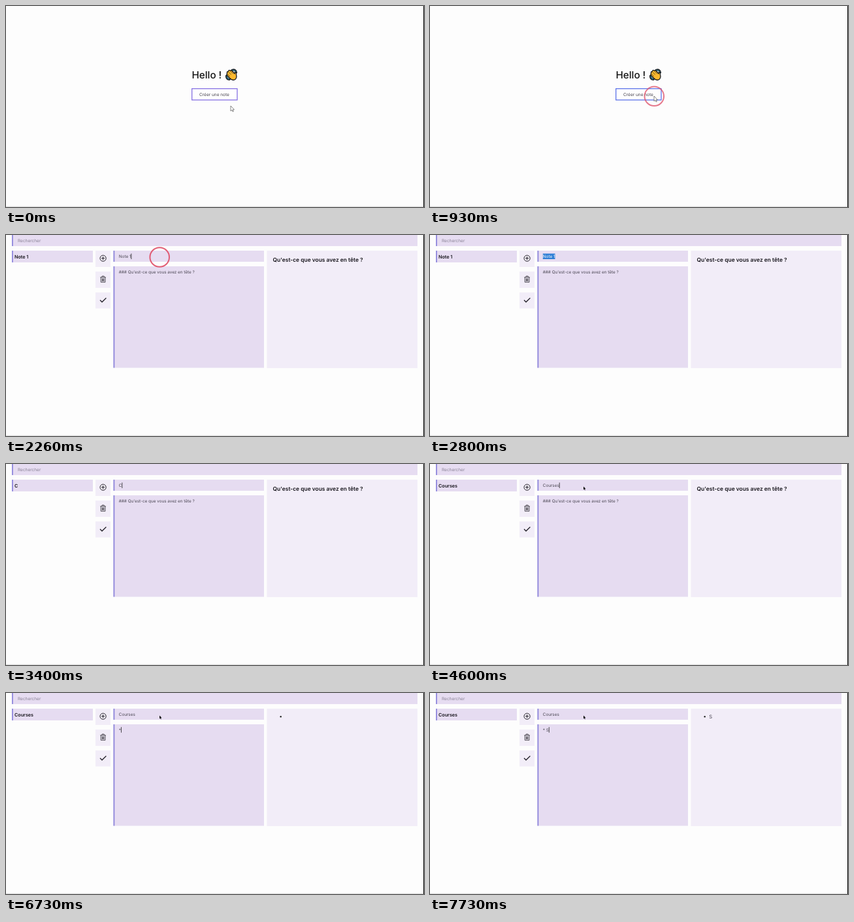
An HTML page for the animation above (8000 ms loop, 640x308 px).

```html
<!DOCTYPE html>
<html lang="fr">
<head>
<meta charset="utf-8">
<title>Notes</title>
<style>
  html, body { margin: 0; height: 100%; overflow: hidden; background: #fdfdfd; }
  svg { display: block; width: 100vw; height: 100vh; }
  text { font: 6.35px Inter, "Open Sans", sans-serif; fill: #4a4653; white-space: pre; text-rendering: geometricPrecision; }
  .field { fill: #e6dcf1; }
  .pale { fill: #f2edf8; }
  .edge { fill: #8f87dc; }
  .icon { fill: none; stroke: #25222b; stroke-width: 1; }
  .strong { font-weight: 600; fill: #17151c; }
  .selection { fill: #2f7fd6; }
  .caret { fill: #222; }
</style>
</head>
<body>
<svg viewBox="0 0 640 308" preserveAspectRatio="none">
  <rect width="640" height="308" fill="#fdfdfd"/>

  <g id="welcome">
    <text x="284.5" y="111" style="font-size:15.2px;font-weight:500;fill:#111">Hello !</text>
    <g stroke="#17191c" stroke-linejoin="round" stroke-linecap="round">
      <path d="M346 98.5Q351.500 96.500 352.500 102M337.500 107Q337.500 112 342 112.500" fill="none" stroke-width="3.200"/>
      <path d="M346.500 98.700Q351 97.500 352 101.500M338 107.500Q338.300 111.300 341.500 112" fill="none" stroke="#2c7f96" stroke-width="1.300"/>
      <path d="M338.500 102.500Q338 100.500 340 100.500L340.500 99.500Q341.500 97.700 343.200 99L344 98.800Q345.500 98.300 346.500 99.800L350 103.800L350 102Q351.600 100.800 352.200 103L353 108Q352.800 113 348 113.500Q345 113.600 342.500 110.500L338.700 106.500Q337.300 104.800 338.500 102.500Z" fill="#fbb92e" stroke-width="1.300"/>
      <path d="M340.500 101L344.500 105M343.500 99.500L347 103.300M339 104L342.500 107.500" fill="none" stroke-width=".6"/>
    </g>
    <rect id="create" x="284.700" y="126.700" width="69.300" height="17.300" fill="#fefefe" stroke-width="1.200"/>
    <text x="296" y="138" style="font-size:6.5px">Créer une note</text>
  </g>

  <g id="app">
    <rect class="field" x="9" y="0" width="621" height="17"/>
    <rect class="edge" x="9" y="0" width="1.800" height="17"/>
    <text x="18" y="11" style="font-size:6.5px;fill:#8b8497">Rechercher</text>

    <rect class="field" x="9" y="24" width="124" height="18"/>
    <rect class="edge" x="9" y="24" width="1.800" height="18"/>
    <text id="item" class="strong" x="13" y="35.700" style="font-size:7.2px"></text>

    <rect class="pale" x="137" y="24" width="23" height="25"/>
    <rect class="pale" x="137" y="56" width="23" height="25"/>
    <rect class="pale" x="137" y="88" width="23" height="24.500"/>
    <g class="icon">
      <circle cx="148.600" cy="35.700" r="4.600"/>
      <path d="M146 35.700h5.200M148.600 33.100v5.200"/>
      <path d="M144.300 64.800h8.600M147 64.500v-1.500h3.200v1.500M145.300 65v7.300h6.600V65M147.300 66.500v4.500M148.600 66.500v4.500M149.900 66.500v4.500" stroke-width=".8"/>
      <path d="M144 99.800l3 3 6.400-6.300" stroke-width="1.300"/>
    </g>

    <rect class="field" x="164.500" y="24" width="230.500" height="17"/>
    <rect class="edge" x="164.500" y="24" width="1.800" height="17"/>
    <rect class="field" x="164.500" y="48" width="230.500" height="155.500"/>
    <rect class="edge" x="164.500" y="48" width="1.800" height="155.500"/>
    <rect id="mark" class="selection" height="8.500"/>
    <text id="title" x="172.800" y="35"></text>
    <text id="body" x="172.800" y="58.700"></text>
    <rect id="caret" class="caret" width=".8" height="8.500"/>

    <rect class="pale" x="399.500" y="24" width="230.500" height="180"/>
    <text id="heading" class="strong" x="408.500" y="41.300" style="font-size:8.45px">Qu'est-ce que vous avez en tête ?</text>
    <g id="list">
      <circle cx="420.700" cy="36.300" r="1.200" fill="#222"/>
      <text id="entry" x="427.300" y="38.700" style="font-size:7.6px">S</text>
    </g>
  </g>

  <circle id="ring" r="14.800" fill="none" stroke="#df5069" stroke-width="2"/>
  <path id="arrow" d="M0 0V8L1.900 6.300L3.200 9L4.400 8.400L3.200 5.800H5.500Z" fill="#fff" stroke="#555" stroke-width=".7"/>
  <path id="pointer" d="M235 34.500v5l1.100-1 .9 1.700.8-.4-.8-1.700h1.500z" fill="#111"/>

  <rect x="0" y="306.800" width="640" height="1.200" fill="#dedede"/>
  <rect x="639" y="0" width="1" height="308" fill="#111"/>
</svg>
<script>
  const LOOP = 8000, STEP = 200 / 3;
  const $ = id => document.getElementById(id);
  const show = (id, on) => $(id).style.display = on ? '' : 'none';
  const within = (t, from, to) => t >= from && t < to;
  const progress = (t, from, to) => Math.min(1, Math.max(0, (t - from) / (to - from)));
  const ease = p => p * p * (3 - 2 * p);

  const WORD = 'Courses', KEYS = [3400, 3600, 3800, 3860, 4060, 4400, 4600];
  const PROMPT = "### Qu'est-ce que vous avez en tête ?";

  function bodyText(t) {
    if (t < 6730) return PROMPT;
    if (t < 7200) return '*';
    return t < 7730 ? '* ' : '* S';
  }

  function place(id, x, y, width) {
    $(id).setAttribute('x', x);
    $(id).setAttribute('y', y);
    if (width) $(id).setAttribute('width', width);
  }

  function drawMouse(t) {
    const y = 153 + 13 * progress(t, 0, 130) - 28 * ease(progress(t, 340, 860));
    $('arrow').setAttribute('transform', `translate(${344 - progress(t, 400, 860)} ${y})`);
    show('arrow', t < 1200);
    show('pointer', t >= 3800);

    let opacity = 0;
    if (within(t, 930, 1200)) opacity = t < 1000 ? .76 : t < 1060 ? .95 : .5;
    if (within(t, 2260, 2600)) opacity = .92 * (1 - progress(t, 2330, 2600));
    const first = t < 1200;
    $('ring').setAttribute('cx', first ? 343.3 : 235.2);
    $('ring').setAttribute('cy', first ? 138.3 : 34);
    $('ring').setAttribute('opacity', opacity);
  }

  function drawNote(t) {
    const typed = KEYS.filter(key => t >= key).length;
    const name = typed ? WORD.slice(0, typed) : 'Note 1';
    $('item').textContent = $('title').textContent = name;
    $('body').textContent = bodyText(t);

    const titleSelected = within(t, 2800, 3400), bodySelected = within(t, 5730, 6730);
    const inTitle = t < 4800;
    const line = inTitle ? 'title' : 'body', top = inTitle ? 28.5 : 52.2;
    const length = $(line).getComputedTextLength();
    place('mark', 172.8, top, length);
    place('caret', 172.8 + length, top);
    show('mark', titleSelected || bodySelected);
    show('caret', t >= 2260 && !titleSelected && !within(t, 5330, 6730));
    $('title').style.fill = titleSelected ? '#fff' : '';
    $('body').style.fill = bodySelected ? '#fff' : '';

    show('heading', t < 6730);
    show('list', t >= 6730);
    show('entry', t >= 7730);
  }

  function draw(now) {
    const t = Math.floor((now % LOOP + 7) / STEP) * STEP;
    show('welcome', t < 1000);
    show('app', t >= 1000);
    $('create').setAttribute('stroke', within(t, 660, 1000) ? '#5068e8' : '#7d66e2');
    if (t >= 1000) drawNote(t);
    drawMouse(t);
    requestAnimationFrame(draw);
  }
  draw(0);
</script>
</body>
</html>
```
